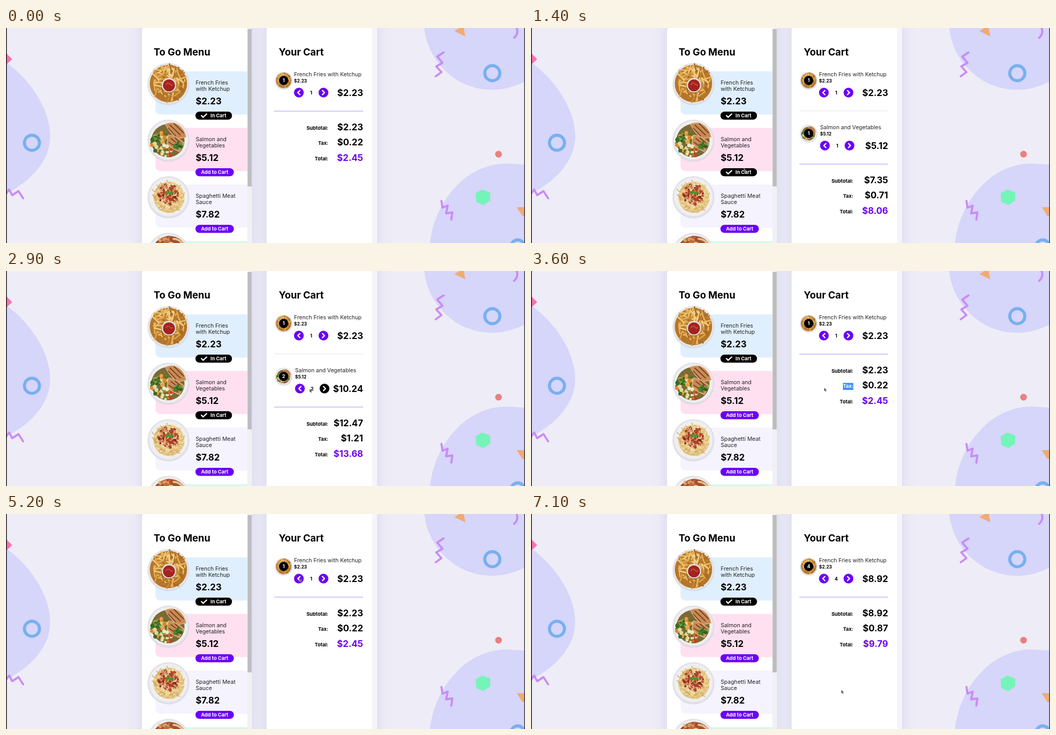
An HTML page for the animation above (7.2 s loop, 1000 by 414 pixels).

```html
<!DOCTYPE html>
<html lang="en">
<head>
<meta charset="utf-8">
<title>To Go Menu</title>
<style>
  html, body { margin: 0; width: 100%; height: 100%; overflow: hidden; background: #eeecf6; }
  svg { display: block; width: 100%; height: 100%; }
  text { font-family: Inter, sans-serif; }
</style>
</head>
<body>
<svg id="stage" viewBox="0 0 1000 414" xmlns="http://www.w3.org/2000/svg">
  <defs id="food"></defs>
  <g id="backdrop"></g>
  <g id="panels"></g>
  <g id="live"></g>
  <path id="cursor" d="M-2-4v6.4l1.6-1.3 1.2 2.4 1.2-.6-1.2-2.3 2-.1z"
        fill="#555" stroke="#fff" stroke-width=".8" paint-order="stroke"/>
</svg>
<script>
const PURPLE = '#6b00f5', BLACK = '#000', LINE = '#d6d2fb';
const LOOP = 7200, STEP = 100, TAX_RATE = 0.097;
const $ = id => document.getElementById(id);

// Shape helpers
const rect = (x, y, w, h, fill, r = 0) =>
  `<rect x="${x}" y="${y}" width="${w}" height="${h}" rx="${r}" fill="${fill}"/>`;
const circle = (x, y, r, fill, more = '') =>
  `<circle cx="${x}" cy="${y}" r="${r}" fill="${fill}" ${more}/>`;
const shape = (d, fill) => `<path d="${d}" fill="${fill}"/>`;
const stroke = (d, color, width) =>
  `<path d="${d}" fill="none" stroke="${color}" stroke-width="${width}" stroke-linecap="round" stroke-linejoin="round"/>`;
const text = (x, y, s, size, weight = 400, fill = '#000', anchor = 'start') =>
  `<text x="${x}" y="${y}" font-size="${size}" font-weight="${weight}" fill="${fill}" text-anchor="${anchor}">${s}</text>`;
const money = v => '$' + v.toFixed(2);

// Seeded randomness for the food textures
let seed = 7;
const rnd = () => (seed = (seed * 16807) % 2147483647) / 2147483647;
const pick = list => list[Math.floor(rnd() * list.length)];
const times = (n, make) => Array.from({ length: n }, (_, i) => make(i)).join('');
const spot = reach => {
  const a = rnd() * Math.PI * 2, r = Math.sqrt(rnd()) * reach;
  return [r * Math.cos(a), r * Math.sin(a)];
};
const strands = (n, reach, length, width, colors, bend) => times(n, () => {
  const [x, y] = spot(reach), a = rnd() * Math.PI * 2;
  const dx = Math.cos(a) * length, dy = Math.sin(a) * length;
  return stroke(`M${x - dx} ${y - dy}Q${x - dy * bend} ${y + dx * bend} ${x + dx} ${y + dy}`, pick(colors), width);
});
const crumbs = (n, reach, size, colors, cx = 0, cy = 0) => times(n, () => {
  const [x, y] = spot(reach);
  return circle(x + cx, y + cy, size * (.6 + rnd() * .6), pick(colors));
});
const plate = circle(0, 1, 40.5, '#cfcfd8', 'opacity=".6"') + circle(0, 0, 39.5, '#e2e2e6') + circle(0, 0, 37, '#efeff1');
const fillet = d => shape(d, '#c98a55') + stroke(d, '#e0b083', 1.5);

const dishes = {
  fries: () => plate + circle(0, 0, 36, '#b5762a')
    + strands(125, 31, 8, 2.6, ['#dfa64a', '#ecc069', '#c98a35', '#e3b05a', '#a96a22', '#f2d08a', '#b97a2c'], .06)
    + circle(1, 4, 15, '#7d5a34', 'opacity=".5"') + circle(1, 3, 14, '#e6dfdc')
    + circle(1, 3.5, 11.5, '#a3241f') + stroke('M-5 2q4-5 8-1t5 1', '#c94f40', 2),
  salmon: () => plate + circle(-1, 1, 32, '#7c6a35')
    + crumbs(70, 20, 3.6, ['#4e7628', '#729a3b', '#2f581f', '#e08423', '#e9a04a', '#dfd6a0', '#3d6a24'], -13, 5)
    + crumbs(28, 12, 3.4, ['#d9741f', '#5d862f', '#e9dfae', '#b8452a', '#efe6c6'], -4, 21)
    + fillet('M-6-31Q8-37 20-29Q31-21 34-6Q25-4 17-3Q2-14-6-31Z')
    + fillet('M0-10L14-7L30 5L21 22L8 16L-3 6Z')
    + stroke('M3-29l20 19M11-32l18 18M0-23l14 15M5-3l16 12M1 4l13 9M13-4l13 11', '#74411f', 1.8)
    + crumbs(20, 8, 2.6, ['#315f20', '#4f7e2e', '#6b963c'], 18, 10),
  spaghetti: () => plate + circle(1, 1, 30, '#e4c583')
    + strands(120, 29, 6, 1.4, ['#efdba6', '#e2bd72', '#f6e9c6', '#d3a85c'], .7)
    + crumbs(110, 20, 2.4, ['#a8402a', '#7f2d1c', '#c4573a', '#912f1f', '#d9845c', '#b4472c'], 0, -5)
    + strands(16, 20, 6, 1.1, ['#ecd3a0'], .6)
    + shape('M-7-9q6-6 9 0q6-5 8 1q-5 7-9 2q-6 4-8-3z', '#4f912e'),
  toast: () => plate + circle(0, 2, 34, '#d9b489')
    + shape('M-30-10Q-24-30 0-34Q24-33 33-14Q24-5 0-8Z', '#a0522f')
    + crumbs(70, 17, 3, ['#8f3d22', '#c06a3b', '#d99a5f', '#a84c2a', '#e6c293'], -4, -16)
    + stroke('M10-28Q23-27 29-16', '#e6c08c', 4)
};
$('food').innerHTML =
  '<filter id="glow" x="-30%" y="-20%" width="160%" height="140%"><feGaussianBlur stdDeviation="13"/></filter>'
  + Object.entries(dishes).map(([id, draw]) => `<g id="${id}">${draw()}</g>`).join('');
const dish = (id, x, y, scale = 1) => `<use href="#${id}" transform="translate(${x} ${y}) scale(${scale})"/>`;

const ring = (x, y, r) => circle(x, y, r, 'none', 'stroke="#78b0ef" stroke-width="6"');
const blob = d => shape(d, '#d6d5fa');
const squiggle = d => stroke(d, '#c98cf5', 4);
$('backdrop').innerHTML = rect(0, 0, 1000, 414, '#eeecf6')
  + blob('M0 66C45 98 85 155 85 208C85 258 45 296 0 319Z')
  + blob('M806 0C812 62 865 119 937 119C962 119 983 111 1000 103V0Z')
  + blob('M817 414C821 375 839 332 872 300C900 273 933 261 965 261L1000 263V414Z')
  + ring(50, 221, 14.5) + ring(937, 87, 14.5) + ring(986, 421, 13)
  + shape('M0 48L12 60L0 71Z', '#f374b4')
  + shape('M864 6L881-5L885 16Z', '#f1aa73') + shape('M984 345H1000V362H995Z', '#f1aa73')
  + squiggle('M843 47L831 55L841 67L829 74L839 85L828 93')
  + squiggle('M839 333L841 346L851 342L848 357L860 355L858 369')
  + squiggle('M0 319L6 311L12 322L24 314L33 328')
  + squiggle('M983-2Q989 10 979 19')
  + circle(949, 243, 6.5, '#e98080')
  + shape('M905 318L918 311L933 317V332L920 341L906 335Z', '#74f4b8')
  + rect(0, 0, 1.5, 414, '#17161a') + rect(998.5, 0, 1.5, 414, '#3b3a40');

const menu = [
  { id: 'fries', name: ['French Fries', 'with Ketchup'], price: 2.23, tint: '#e0effe' },
  { id: 'salmon', name: ['Salmon and', 'Vegetables'], price: 5.12, tint: '#ffe0f0' },
  { id: 'spaghetti', name: ['Spaghetti Meat', 'Sauce'], price: 7.82, tint: '#f5f3fe' },
  { id: 'toast', name: ['', ''], price: 0, tint: '#d9f7ec' }
];
const glow = x => `<rect x="${x}" y="-30" width="212" height="480" fill="#b6bce6" opacity=".5" filter="url(#glow)"/>`;
const card = (item, i) => {
  const y = 109 * i;
  return rect(288, 83.5 + y, 177, 83, item.tint, 9) + rect(450, 83.5 + y, 15, 83, item.tint)
    + dish(item.id, 313, 107 + y)
    + (item.price ? text(365.5, 109 + y, item.name[0], 10.7, 400, '#222')
      + text(365.5, 120.5 + y, item.name[1], 10.7, 400, '#222')
      + text(365.5, 147 + y, money(item.price), 17.2, 700) : '');
};
$('panels').innerHTML = glow(262) + glow(502)
  + rect(262, -4, 212, 440, '#fff', 9) + rect(502, -4, 213, 440, '#fff', 9)
  + rect(465, 0, 9, 414, '#f1f0f3') + rect(465.5, 2, 8, 303, '#bdbdbf')
  + rect(705, 0, 10, 414, '#f5f4f9')
  + text(284.5, 53, 'To Go Menu', 18.8, 700) + text(525.5, 53, 'Your Cart', 18.8, 700)
  + menu.map(card).join('');

// Start time, fries, salmon, hovered arrow, tax label selected
const states = [
  [0, 1, 0], [1200, 1, 1], [2200, 1, 1, 'salmon>'], [2400, 1, 2, 'salmon>'],
  [3000, 1, 2], [3200, 1, 2, 'salmon<'], [3300, 1, 1, 'salmon<'],
  [3500, 1, 0, '', true], [4600, 1, 0],
  [6200, 1, 0, 'fries>'], [6300, 2, 0, 'fries>'], [6500, 3, 0, 'fries>'],
  [6700, 4, 0, 'fries>'], [6900, 4, 0]
];
const cursorPath = [
  [0, 430, 432], [400, 430, 432], [900, 397, 278], [1300, 397, 278], [1900, 606, 233],
  [2600, 606, 233], [2900, 587, 231], [3100, 567, 229], [3700, 567, 229], [4200, 576, 112],
  [4600, 567, 127], [5500, 567, 127], [6000, 606, 127], [6700, 606, 127], [7100, 600, 343]
];

function menuButton(i, inCart) {
  const y = 109 * i;
  return inCart
    ? rect(365, 161 + y, 70.5, 15.5, BLACK, 7.75) + stroke(`M376.5 ${168.5 + y}l3.3 3.4 6.8-6.2`, '#fff', 2.3)
      + text(394, 172.2 + y, 'In Cart', 9.4, 700, '#fff')
    : rect(365, 161 + y, 74, 15.5, PURPLE, 7.75) + text(402, 172.2 + y, 'Add to Cart', 9.5, 700, '#fff', 'middle');
}

function arrow(x, y, dir, hovered) {
  return circle(x, y, 9.4, hovered ? BLACK : PURPLE)
    + stroke(`M${x - 2 * dir} ${y - 4}l${4 * dir} 4l${-4 * dir} 4`, '#fff', 2.2);
}

function cartRow(item, qty, row, hover) {
  const x = 2 * row, y = 102 * row;
  return circle(535, 101.5 + y, 17, '#dedfe8') + dish(item.id, 535, 101 + y, .41)
    + circle(535, 101 + y, 9, BLACK) + text(535, 104.4 + y, qty, 9.2, 700, '#fff', 'middle')
    + text(555 + x, 92.5 + y, item.name.join(' '), 10.6, 400, '#222')
    + text(555 + x, 104.8 + y, money(item.price), 8.6, 700)
    + arrow(564.3 + x, 124.4 + y, -1, hover === item.id + '<')
    + arrow(611.7 + x, 124.4 + y, 1, hover === item.id + '>')
    + text(588 + x, 127.8 + y, qty, 9.2, 700, BLACK, 'middle')
    + text(688, 131 + y, money(qty * item.price), 17.2, 700, BLACK, 'end');
}

function totals(sum, y, selected) {
  const tax = Math.round(sum * TAX_RATE * 100) / 100;
  const line = (label, value, dy, color, labelColor = BLACK) =>
    text(621, y + dy - 1.2, label, 9.5, 700, labelColor, 'end')
    + text(688, y + dy, money(value), 17.2, 700, color, 'end');
  return (selected ? rect(601, y + 18.5, 20, 13.5, '#3990fa') : '')
    + line('Subtotal:', sum, 0, BLACK)
    + line('Tax:', tax, 29.4, BLACK, selected ? '#fff' : BLACK)
    + line('Total:', sum + tax, 58.8, PURPLE);
}

function drawState([, fries, salmon, hover, selected]) {
  const qty = [fries, salmon, 0];
  const rows = menu.slice(0, 2).filter((_, i) => qty[i]);
  const shift = 102 * (rows.length - 1);
  const sum = rows.reduce((acc, item, i) => acc + qty[i] * item.price, 0);
  $('live').innerHTML = qty.map((n, i) => menuButton(i, n > 0)).join('')
    + rows.map((item, i) => cartRow(item, qty[i], i, hover)).join('')
    + (shift ? rect(517, 159, 171, 1, '#e3e3ee') : '')
    + rect(517, 158.8 + shift, 171, 2.6, LINE)
    + totals(sum, 197 + shift, selected);
}

function cursorAt(t) {
  const i = cursorPath.findIndex(key => key[0] > t);
  if (i < 0) return cursorPath.at(-1).slice(1);
  const [t0, x0, y0] = cursorPath[i - 1], [t1, x1, y1] = cursorPath[i];
  const p = (t - t0) / (t1 - t0), e = p * p * (3 - 2 * p);
  return [x0 + (x1 - x0) * e, y0 + (y1 - y0) * e];
}

let shown = null;
const start = performance.now();
function tick() {
  const t = Math.floor(((performance.now() - start) % LOOP) / STEP) * STEP;
  const state = states.findLast(s => s[0] <= t);
  if (state !== shown) drawState(shown = state);
  $('cursor').setAttribute('transform', `translate(${cursorAt(t).join(' ')})`);
  requestAnimationFrame(tick);
}
tick();
</script>
</body>
</html>
```
